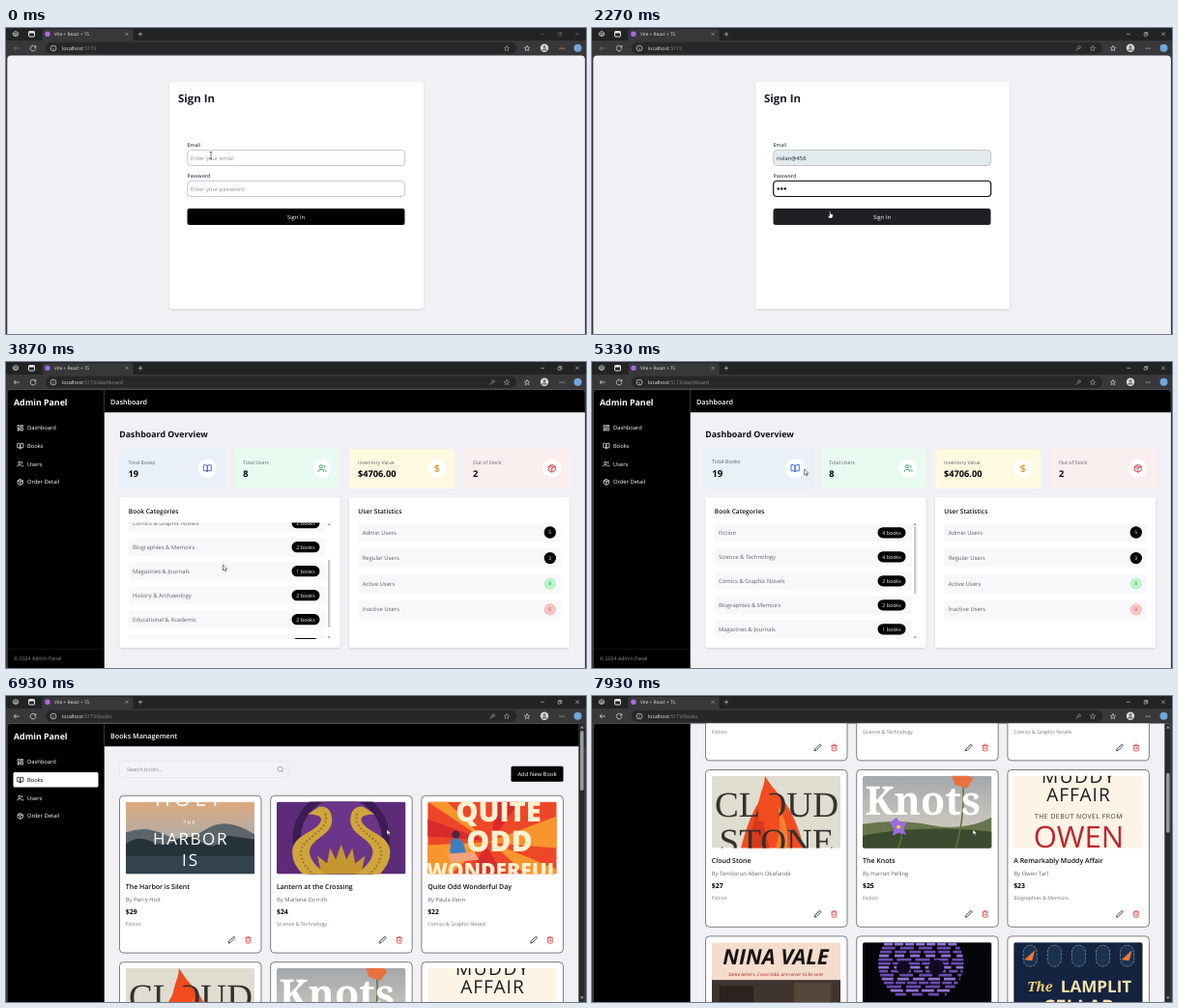
An HTML page for the animation above (8 s loop, 600 px wide and 317 px high).

```html
<!DOCTYPE html>
<html lang="en">
<head>
<meta charset="utf-8">
<title>Admin panel walkthrough</title>
<style>
html, body { margin: 0; height: 100%; overflow: hidden; background: #38383b; }
svg { font-family: "Open Sans", "Noto Sans", sans-serif; text-rendering: geometricPrecision; }
#stage { display: block; width: 100vw; height: 100vh; }
.serif { font-family: "Noto Serif", "Liberation Serif", serif; }
.thin { font-family: "Liberation Serif", "Noto Serif", serif; }
</style>
</head>
<body>
<svg id="stage" viewBox="0 0 600 317"></svg>
<script>
const ICONS = {
  dash: 'M3 3h7v9H3zM14 3h7v5h-7zM14 12h7v9h-7zM3 16h7v5H3z',
  book: 'M2 3h6a4 4 0 0 1 4 4v14a3 3 0 0 0-3-3H2zM22 3h-6a4 4 0 0 0-4 4v14a3 3 0 0 1 3-3h7z',
  users: 'M16 21v-2a4 4 0 0 0-4-4H6a4 4 0 0 0-4 4v2M5 7a4 4 0 1 0 8 0a4 4 0 1 0-8 0M22 21v-2a4 4 0 0 0-3-3.9M16 3.1a4 4 0 0 1 0 7.8',
  box: 'M12 2l9 5v10l-9 5-9-5V7zM3 7l9 5 9-5M12 22V12M7.5 4.3l9 5.1',
  dollar: 'M12 2v20M17 5H9.5a3.5 3.5 0 0 0 0 7h5a3.5 3.5 0 0 1 0 7H6',
  pencil: 'M17 3a2.8 2.8 0 0 1 4 4L7.5 20.5 2 22l1.5-5.5z',
  trash: 'M3 6h18M19 6v14a2 2 0 0 1-2 2H7a2 2 0 0 1-2-2V6M8 6V4a2 2 0 0 1 2-2h4a2 2 0 0 1 2 2v2M10 11v6M14 11v6',
  search: 'M3 11a8 8 0 1 0 16 0a8 8 0 1 0-16 0M21 21l-4.3-4.3',
  back: 'M21 12H3M10 5l-7 7 7 7',
  reload: 'M20 8a9 9 0 1 0 1 5M21 3v6h-6',
  info: 'M2 12a10 10 0 1 0 20 0a10 10 0 1 0-20 0M12 11v6M12 7v1',
  star: 'M12 2l3 7 7 .6-5.3 4.8 1.6 7.1L12 17.7l-6.3 3.8 1.6-7.1L2 9.6 9 9z',
  key: 'M11 9a5 5 0 1 0 10 0a5 5 0 1 0-10 0M12 12l-9 9M6 18l3 3',
  close: 'M4 4l16 16M20 4L4 20',
  plus: 'M12 3v18M3 12h18',
  min: 'M3 12h18',
  max: 'M4 8h12v12H4zM8 8V4h12v12h-4',
  tabs: 'M3 8l9-5 9 5v9l-9 4-9-4zM8 10h8v7H8z'
};

// Text is placed by the middle of its capitals.
const text = (x, y, s, size, fill = '#000', more = '') =>
  `<text x="${x}" y="${y + size * .357}" font-size="${size}" fill="${fill}" ${more}>${s}</text>`;
const mid = 'text-anchor="middle" ';
const weight = w => `font-weight="${w}" `;
const rect = (x, y, w, h, fill, r = 0, more = '') =>
  `<rect x="${x}" y="${y}" width="${w}" height="${h}" rx="${r}" fill="${fill}" ${more}/>`;
const circle = (x, y, r, fill, more = '') => `<circle cx="${x}" cy="${y}" r="${r}" fill="${fill}" ${more}/>`;
const path = (d, fill, more = '') => `<path d="${d}" fill="${fill}" ${more}/>`;
const line = (d, color, width, more = '') => path(d, 'none', `stroke="${color}" stroke-width="${width}" ${more}`);
const icon = (name, x, y, size, color, more = '') =>
  `<g transform="translate(${x - size / 2} ${y - size / 2}) scale(${size / 24})" ${more}>` +
  line(ICONS[name], color, 2.3, 'stroke-linejoin="round"') + '</g>';
const group = (id, body, more = '') => `<g id="${id}" ${more}>${body}</g>`;

function chrome() {
  const pale = '#e4e4e4', dim = '#a5a5a7';
  return rect(0, 0, 600, 317, '#38383b') + rect(0, 0, 600, 13, '#222325') +
    rect(37.5, 1, 94, 14, '#38383b', 2.5) +
    icon('tabs', 10, 6, 7, pale) + rect(23.5, 3.5, 6, 5.5, 'none', 1, `stroke="${pale}"`) + rect(23.5, 3.5, 6, 2, pale) +
    circle(43, 6.3, 2.7, '#a66be0') + text(50, 6.3, 'Vite + React + TS', 4.75, pale) +
    icon('close', 125, 6.3, 4.5, pale) + icon('plus', 139, 6.3, 6, pale) +
    group('controls', icon('min', 555, 6.3, 5.5, pale) + icon('max', 573, 6.3, 5.5, pale) + icon('close', 591, 6.3, 5.5, pale)) +
    rect(41, 14.8, 487, 12, '#272729', 6) +
    icon('back', 11, 21, 7.5, pale, 'id="back"') + icon('reload', 28, 21, 7.5, pale) + icon('info', 49, 21, 7, pale) +
    text(58, 20.7, 'localhost<tspan id="route" fill="#8d8d8f"></tspan>', 5.2, '#f2f2f2') +
    icon('key', 503, 21, 6.5, dim, 'id="key"') + icon('star', 518, 21, 6.5, dim) +
    icon('star', 539, 21, 6.5, pale) + circle(557, 20.8, 4.2, '#dcdcdc') +
    circle(557, 19.6, 1.5, '#777') + path('M554.3 23.5a2.7 2.3 0 0 1 5.4 0z', '#777') +
    [573, 575, 577].map(x => circle(x, 21, .6, pale)).join('') + circle(591.5, 20.8, 4, '#6fa8dc');
}

function login() {
  const field = (id, y, hint) =>
    rect(187.7, y - 8, 225, 16, '#fff', 3.5, `id="${id}Box"`) + text(191, y, hint, 5.8, '#8b8f98', `id="${id}Text"`);
  return rect(0, 28, 600, 290, '#f1f0f5') + rect(169, 56, 263, 235, '#fff', 3.5, 'filter="url(#soft)"') +
    text(178, 73, 'Sign In', 11.4, '#171b26', weight(700)) +
    text(187.5, 121.3, 'Email', 5.1, '#374151', weight(600)) + field('email', 134.5, 'Enter your email') +
    text(187.5, 153.3, 'Password', 5.1, '#374151', weight(600)) + field('pass', 166.5, 'Enter your password') +
    group('dots', [0, 1, 2].map(i => circle(192.7 + i * 3.5, 166.6, 1.25, '#111')).join('')) +
    rect(0, 163, .5, 7, '#111', 0, 'id="caret"') +
    rect(187.5, 187, 225, 17, '#000', 2.5, 'id="submit"') + text(300, 195.7, 'Sign In', 5.8, '#fff', mid + weight(500));
}

const loading = () => rect(0, 28, 600, 290, '#d1d4dc') +
  rect(275.3, 142.3, 49.4, 61.5, '#fff', 3, 'filter="url(#deep)"') +
  path('M-12.7 0A12.7 12.7 0 0 1 12.7 0A12.7 11.2 0 0 0 -12.7 0', '#000', 'id="spinner"') +
  text(300, 189, 'Loading...', 6.6, '#374151', mid + weight(600));

function sidebar(active) {
  const items = [['dash', 'Dashboard'], ['book', 'Books'], ['users', 'Users'], ['box', 'Order Detail']];
  return rect(0, 28, 101.7, 1300, '#000') + text(8, 41.5, 'Admin Panel', 8.8, '#fff', weight(700)) +
    items.map(([name, label], i) => {
      const y = 68.3 + i * 18.7;
      const row = c => icon(name, 14.8, y, 7.3, c) + text(22, y, label, 5.8, c, weight(500));
      const lit = i == 1 ? rect(7.5, y - 7.9, 88, 15.4, '#fff', 1.5) + row('#000') : '';
      return row('#fff') + (lit && (active ? lit : group('hover', lit)));
    }).join('');
}
const header = title => rect(101.7, 28, 498, 24.2, '#000') + text(108, 41, title, 7.2, '#fff', weight(600));

function dashboard() {
  const cards = [
    ['Total Books', '19', 'book', '#3566c8', '#eaf0f7'], ['Total Users', '8', 'users', '#2f9e57', '#e9faf0'],
    ['Inventory Value', '$4706.00', 'dollar', '#cf8a1c', '#fef9df'], ['Out of Stock', '2', 'box', '#d32f3c', '#fbeeee']];
  const genres = [['Fiction', 4], ['Science &amp; Technology', 4], ['Comics &amp; Graphic Novels', 2], ['Biographies &amp; Memoirs', 2],
    ['Magazines &amp; Journals', 1], ['History &amp; Archaeology', 2], ['Educational &amp; Academic', 2], ['Poetry &amp; Drama', 2]];
  const people = [['Admin', 5, '#000', '#fff'], ['Regular', 3, '#000', '#fff'], ['Active', 8, '#bbf5cd', '#238a4a'], ['Inactive', 0, '#f4c5c3', '#b84343']];
  const panel = (x, title) => rect(x, 140, 228, 156, '#fff', 3, 'filter="url(#soft)"') +
    text(x + 9.3, 155, title, 6.6, '#111', weight(600));
  return rect(0, 28, 600, 290, '#f1f0f5') + sidebar(false) +
    rect(0, 297, 102, .4, '#2c2f36') + text(8, 307.3, '© 2024 Admin Panel', 5.2, '#8b919c') + header('Dashboard') +
    text(117.3, 75, 'Dashboard Overview', 8.8, '#0d0d12', weight(700)) +
    cards.map(([label, value, name, color, bg], i) => {
      const x = 117.3 + i * 118.8;
      return group('card' + i, rect(x, 90, 109.5, 41, bg, 3) + text(x + 9.2, 103.7, label, 5.2, '#5c6370') +
        text(x + 9.2, 115.3, value, 9.2, '#000', weight(700)) + circle(x + 91, 110.3, 9.6, '#fff') + icon(name, x + 91, 110.3, 9.5, color));
    }).join('') +
    panel(117.5, 'Book Categories') + panel(355, 'User Statistics') +
    '<svg x="126" y="166.5" width="205.5" height="120.5" viewBox="126 166.5 205.5 120.5">' +
    group('list', genres.map(([label, n], i) => {
      const y = 176.8 + i * 25;
      return rect(127, y - 9.5, 204, 19, '#f8f8fb', 2) + text(131, y, label, 5.9, '#5a616d') +
        rect(295.5, y - 5.6, 29, 11.2, '#000', 5.6) + text(310, y, n + ' books', 5.3, '#fff', mid);
    }).join('')) + '</svg>' +
    path('M332.6 169l1.6-2 1.6 2zM332.6 284.5l1.6 2 1.6-2z', '#8a8a90') + rect(333, 170, 2.5, 70, '#cacad0', 1.2, 'id="listThumb"') +
    people.map(([label, n, bg, fg], i) => {
      const y = 176.5 + i * 26.6;
      return rect(364, y - 9.5, 210, 19, '#f8f8fb', 2) + text(368.7, y, label + ' Users', 5.9, '#5a616d') +
        circle(562.8, y, 6.2, bg) + text(562.8, y, n, 5, fg, mid);
    }).join('');
}

// Covers are drawn in a 133 by 75 box.
const label = (x, y, s, size, fill, more = '') => text(x, y, s, size, fill, mid + more);
const serif = 'class="serif" ', thin = 'class="thin" ', italic = 'font-style="italic" ';
const bird = path('M32 13L44 5Q56 4 57 18C58 36 32 38 34 54Q36 66 56 78H30Q16 66 16 52C17 32 44 32 46 18Q45 13 32 13z', '#d0a53c') +
  line('M50 12C56 32 24 36 25 54Q27 68 42 78', '#a3752a', 2, 'stroke-dasharray="2 2"');
const covers = [
  rect(0, 0, 133, 75, 'url(#dusk)') + path('M0 32Q20 24 40 34T82 29T133 34V54H0z', '#5b6469') +
    path('M0 44Q12 34 26 41T52 40T78 42T104 35L133 39V75H0z', '#26323a') + rect(0, 56, 133, 19, '#33424d') +
    label(66, -3, 'HOLT', 22, '#fff', 'letter-spacing="4"') + label(66, 21.5, 'THE', 5.5, '#fff', 'letter-spacing="1"') +
    label(67, 38.5, 'HARBOR', 17, '#fff', 'letter-spacing="1.5"') + label(67, 60, 'IS', 17, '#fff', 'letter-spacing="2"'),
  rect(0, 0, 133, 75, '#5c2c78') + circle(66.5, 38, 50, '#3c1c52') + circle(66.5, 38, 42, '#6b3589') +
    path('M66.5 75L46 75 42 56 52 64 55 48 61 60 66.5 44 72 60 78 48 81 64 91 56 87 75z', '#c4962f') +
    bird + `<g transform="translate(133 0) scale(-1 1)">${bird}</g>`,
  rect(0, 0, 133, 75, '#ee4728') + path('M0 0L60 40 20 0zM133 15L62 42 133 48zM0 45L60 42 24 75H0zM100 75L66 42 133 70V75z', '#f8962d') +
    path('M70 0L66 40 95 0zM60 45L44 75H78zM0 18L60 40 0 36z', '#d92a2b') +
    label(73, 10, 'QUITE', 29, '#fff0cf', weight(800)) + label(74, 41, 'ODD', 30, '#fff0cf', weight(800)) +
    label(67, 71, 'WONDERFUL', 21, '#fff0cf', weight(800)) +
    circle(29, 34, 4, '#4a2a3d') + path('M24 40Q32 34 37 44L41 58 32 61 23 52z', '#3c7fc0') + path('M20 54L48 52 53 60 24 63z', '#f3a27c'),
  rect(0, 0, 133, 75, '#dfddd0') + path('M55 0Q62 12 72 22Q88 44 95 75H30Q38 44 48 28Q54 14 55 0z', '#f04c1f') +
    path('M54 20Q50 44 60 75H38Q42 43 54 20z', '#d83a1b') + path('M68 30Q80 50 78 75H66Q73 52 68 30z', '#f7812f') +
    label(67, 29, 'CLOUD', 37, '#35312f', thin) + label(67, 67, 'STONE', 37, '#35312f', thin) +
    path('M55 6Q60 24 70 40Q64 50 48 46Q46 26 55 6z', '#f04c1f'),
  rect(0, 0, 133, 75, 'url(#field)') + path('M0 50Q35 44 70 51T133 43V75H0z', '#68754c') + path('M0 62Q60 50 133 58V75H0z', '#3b4a2f') +
    line('M96 75Q106 40 103 6M36 75Q43 62 38 52', '#587638', 1.5) + path('M92 0Q104 -5 114 3L107 13 95 9z', '#eb7040') +
    label(62, 26, 'Knots', 41, '#fff', serif + weight(700)) + path('M28 48l7-5 3 5h7l-3 7 3 6-8-2-6 3 1-7z', '#9a6de0') + circle(37, 53, 2, '#f2c94c'),
  rect(0, 0, 133, 75, '#fdf4e6') + label(67, 0, 'MUDDY', 19, '#1d1b1d', 'letter-spacing="1.5"') +
    label(67, 19, 'AFFAIR', 19, '#1d1b1d', 'letter-spacing="1"') + label(67, 42, 'THE DEBUT NOVEL FROM', 6.8, '#3a3634', 'letter-spacing=".5"') +
    label(67, 63, 'OWEN', 31, '#bd2430'),
  rect(0, 0, 133, 75, '#f5ddcd') + label(66, 15, 'NINA VALE', 22, '#171313', italic + weight(700)) +
    label(66, 33, 'Some letters, I was told, are never to be sent', 4.8, '#a92d28', serif + italic) +
    rect(0, 39, 133, 36, '#3f342e') + rect(8, 45, 35, 30, '#2a2320') + rect(85, 42, 38, 33, '#57473a'),
  rect(0, 0, 133, 75, '#050408') +
    [...Array(14)].map((_, i) => {
      const half = 44 * Math.sqrt(1 - ((i - 5) / 10) ** 2);
      return line(`M${60 - half} ${2 + i * 4}H${60 + half}`, i % 3 ? '#6b4bb0' : '#9274d6', 2.6, `stroke-dasharray="${9 + i * 5 % 7} ${2 + i * 3 % 5}"`);
    }).join('') + circle(42, 26, 7, '#110a20') + circle(76, 26, 8, '#110a20'),
  rect(0, 0, 133, 75, '#14233f') + [17, 42, 67, 92, 117].map((x, i) =>
    rect(x - 7, 3, 14, 22, '#1b3152', 7, 'stroke="#7d8f8f" stroke-width=".8" stroke-dasharray="3 1"') +
    (i % 4 ? '' : path(`M${x - 6} 18L${x + 5} 8 ${x + 2} 19z`, '#eb7a35'))).join('') +
    label(27, 46, 'The', 14, '#f2cf72', serif + italic + weight(700)) +
    label(85, 46, 'LAMPLIT', 17, '#f6e3ad', weight(700)) + label(67, 67, 'CELLAR', 20, '#f6e3ad', weight(700))
];
const shelf = [
  ['The Harbor is Silent', 'Perry Holt', 29, 'Fiction'],
  ['Lantern at the Crossing', 'Marlene Dorrith', 24, 'Science &amp; Technology'],
  ['Quite Odd Wonderful Day', 'Paula Venn', 22, 'Comics &amp; Graphic Novels'],
  ['Cloud Stone', 'Temilorun Abeni Okafande', 27, 'Fiction'],
  ['The Knots', 'Harriet Pelling', 25, 'Fiction'],
  ['A Remarkably Muddy Affair', 'Owen Tarl', 23, 'Biographies &amp; Memoirs'],
  ['Nina Vale', 'Ivo Marsten', 21, 'Fiction'], ['Violet Engine', 'Dora Quill', 26, 'Fiction'], ['The Lamplit Cellar', 'Hugo Brant', 20, 'Fiction']];

function books() {
  const cards = shelf.map(([title, author, price, genre], i) => {
    const x = 117.5 + i % 3 * 156.2, y = 103.3 + Math.floor(i / 3) * 172.4, left = x + 6.3;
    return rect(x, y, 146.5, 162.8, '#fff', 4, 'stroke="#4a4a50" stroke-width=".7"') +
      `<svg x="${left}" y="${y + 6.3}" width="133.5" height="75" viewBox="0 0 133 75" preserveAspectRatio="none">` +
      `<g clip-path="url(#cover)">${covers[i]}</g></svg>` +
      text(left, y + 94, title, 7, '#0d0d12', weight(600)) + text(left, y + 107.2, 'By ' + author, 5.9, '#5f6572') +
      text(left, y + 120.2, '$' + price, 6.9, '#000', weight(700)) + text(left, y + 133, genre, 5.2, '#6b7280') +
      icon('pencil', x + 116, y + 149.4, 8, '#111') + icon('trash', x + 133, y + 149.4, 8, '#dc3030');
  }).join('');
  return rect(0, 28, 600, 290, '#f1f0f5') + group('scroll', sidebar(true) + header('Books Management') +
    rect(117.5, 67.5, 174.5, 17, '#f3f2f6', 3, 'stroke="#e2e1e8" stroke-width=".6"') + text(125, 76, 'Search books...', 5.3, '#85858d') +
    icon('search', 284, 76, 7.5, '#85858d') + rect(522.5, 72.8, 54, 16, '#000', 1.5) + text(549.5, 80.8, 'Add New Book', 5.9, '#fff', mid + weight(500)) + cards) +
    rect(592.3, 28, 8, 290, '#2b2b2d') + path('M593.8 33.5l2-2.5 2 2.5zM593.8 311.5l2 2.5 2-2.5z', '#9a9a9c') +
    rect(594, 36, 3.6, 62, '#9b9b9d', 1.8, 'id="pageThumb"');
}

const cursors = group('arrow', path('M0 0V6L1.4 4.8 2.3 6.8 3.3 6.4 2.4 4.5H4.3z', '#fff', 'stroke="#111" stroke-width=".5"')) +
  group('beam', line('M-1.3 -3.5H1.3M0 -3.5V3.5M-1.3 3.5H1.3', '#222', .6)) +
  group('hand', path('M-.6 0H.6V2.7L3 3.3V5.5L2 7.3H-1L-2.5 4.6 -.6 5z', '#fff', 'stroke="#111" stroke-width=".5"'));

const stage = document.getElementById('stage');
stage.innerHTML = `<defs>
  <clipPath id="page">${rect(1.3, 28.4, 597.6, 292, '#000', 4)}</clipPath>
  <clipPath id="cover">${rect(0, 0, 133, 75, '#000', 2)}</clipPath>
  <filter id="soft"><feDropShadow dx="0" dy="1" stdDeviation="1" flood-opacity=".14"/></filter>
  <filter id="deep" x="-50%" y="-50%" width="200%" height="200%"><feDropShadow dx="0" dy="5" stdDeviation="4" flood-opacity=".2"/></filter>
  <linearGradient id="dusk" x2="0" y2="1"><stop stop-color="#dca97f"/><stop offset=".45" stop-color="#b5aca2"/></linearGradient>
  <linearGradient id="field" x2="0" y2="1"><stop stop-color="#a3a8ac"/><stop offset=".65" stop-color="#c9c5bc"/></linearGradient>
</defs>` + chrome() + `<g clip-path="url(#page)">` +
  group('login', login()) + group('loading', loading()) + group('dashboard', dashboard()) + group('books', books()) + '</g>' + group('cursor', cursors);

const el = Object.fromEntries([...stage.querySelectorAll('[id]')].map(e => [e.id, e]));
const set = (id, attrs) => { for (const k in attrs) el[id].setAttribute(k, attrs[k]); };
const show = (id, on) => { el[id].style.display = on ? '' : 'none'; };
const move = (id, x, y) => set(id, { transform: `translate(${x} ${y})` });
const ramp = (t, a, b) => Math.max(0, Math.min(1, (t - a) / (b - a)));

// Linear track through [time, ...values] keys.
function track(keys, t) {
  const i = keys.findIndex(k => k[0] > t);
  if (i == 0) return keys[0].slice(1);
  if (i < 0) return keys.at(-1).slice(1);
  const a = keys[i - 1], b = keys[i], p = ramp(t, a[0], b[0]);
  return a.slice(1).map((v, j) => v + (b[j + 1] - v) * p);
}

const pointer = [[0, 212, 132], [270, 212, 132], [800, 220, 150], [900, 220, 150], [1130, 238, 166], [2000, 238, 166], [2330, 248, 195],
  [2570, 248, 195], [2600, 249.5, 232], [3530, 249.5, 232], [3700, 224.5, 210], [4600, 224.5, 210], [5070, 200, 118], [5330, 219, 111],
  [5500, 330, 112], [5700, 450, 112], [5870, 545, 115], [5930, 545, 150], [6000, 545, 150], [6400, 45, 87], [6650, 45, 87], [6930, 394, 138]];
const listKeys = [[3670, 0], [3870, 60], [4070, 78], [4270, 78], [4600, 0]];
const pageKeys = [[7530, 0], [7730, 85], [7930, 199], [8000, 215]];
const hoverTimes = [5020, 5350, 5540, 5745, 5890];

function draw(t) {
  const scene = t < 2600 ? 'login' : t < 3130 ? 'loading' : t < 6600 ? 'dashboard' : 'books';
  ['login', 'loading', 'dashboard', 'books'].forEach(s => show(s, s == scene));
  el.route.textContent = ':5173' + { login: '', loading: '/dashboard', dashboard: '/dashboard', books: '/books' }[scene];
  set('controls', { opacity: t < 130 ? .4 : 1 });
  set('back', { opacity: scene == 'login' ? .35 : 1 });
  show('key', t >= 1400);

  const filled = t >= 800, inPass = t >= 1130, inEmail = t >= 200 && !inPass;
  const typed = [1400, 1530, 1670].filter(k => t >= k).length;
  const border = on => ({ stroke: on ? '#111' : '#aeb4be', 'stroke-width': on ? 1.2 : .7 });
  set('emailBox', { ...border(inEmail), fill: filled ? '#e2eaed' : '#fff' });
  set('passBox', border(inPass));
  el.emailText.textContent = filled ? 'nolan@456' : 'Enter your email';
  set('emailText', { fill: filled ? '#1c2530' : '#8b8f98' });
  show('passText', !typed);
  [...el.dots.children].forEach((d, i) => { d.style.display = i < typed ? '' : 'none'; });
  show('caret', inEmail && !filled || inPass && t < 2200);
  set('caret', { x: 190.8 + typed * 3.5, y: inPass ? 163 : 131 });
  set('submit', { fill: t >= 2250 ? '#1f1f23' : '#000' });

  set('spinner', { transform: `translate(300 164.7) rotate(${(t - 2600) * .36})` });

  const [listY] = track(listKeys, t), [pageY] = track(pageKeys, t);
  move('list', 0, -listY);
  move('listThumb', 0, listY * .58);
  for (let i = 0; i < 4; i++) {
    const s = 1 + .05 * (ramp(t, hoverTimes[i], hoverTimes[i] + 150) - ramp(t, hoverTimes[i + 1], hoverTimes[i + 1] + 150));
    const cx = 172 + i * 118.8;
    set('card' + i, { transform: `translate(${cx} 110.5) scale(${s}) translate(${-cx} -110.5)` });
  }
  show('hover', t >= 6370);
  move('scroll', 0, -pageY);
  move('pageThumb', 0, pageY * .22);

  move('cursor', ...track(pointer, t));
  show('cursor', t < 1400 || t >= 2000);
  const hand = t >= 2250 && t < 2600 || t >= 6370 && t < 6700;
  const beam = t < 2250;
  show('hand', hand);
  show('beam', beam);
  show('arrow', !hand && !beam);
}

const start = performance.now();
function frame() {
  draw((performance.now() - start) % 8000);
  requestAnimationFrame(frame);
}
frame();
</script>
</body>
</html>
```
